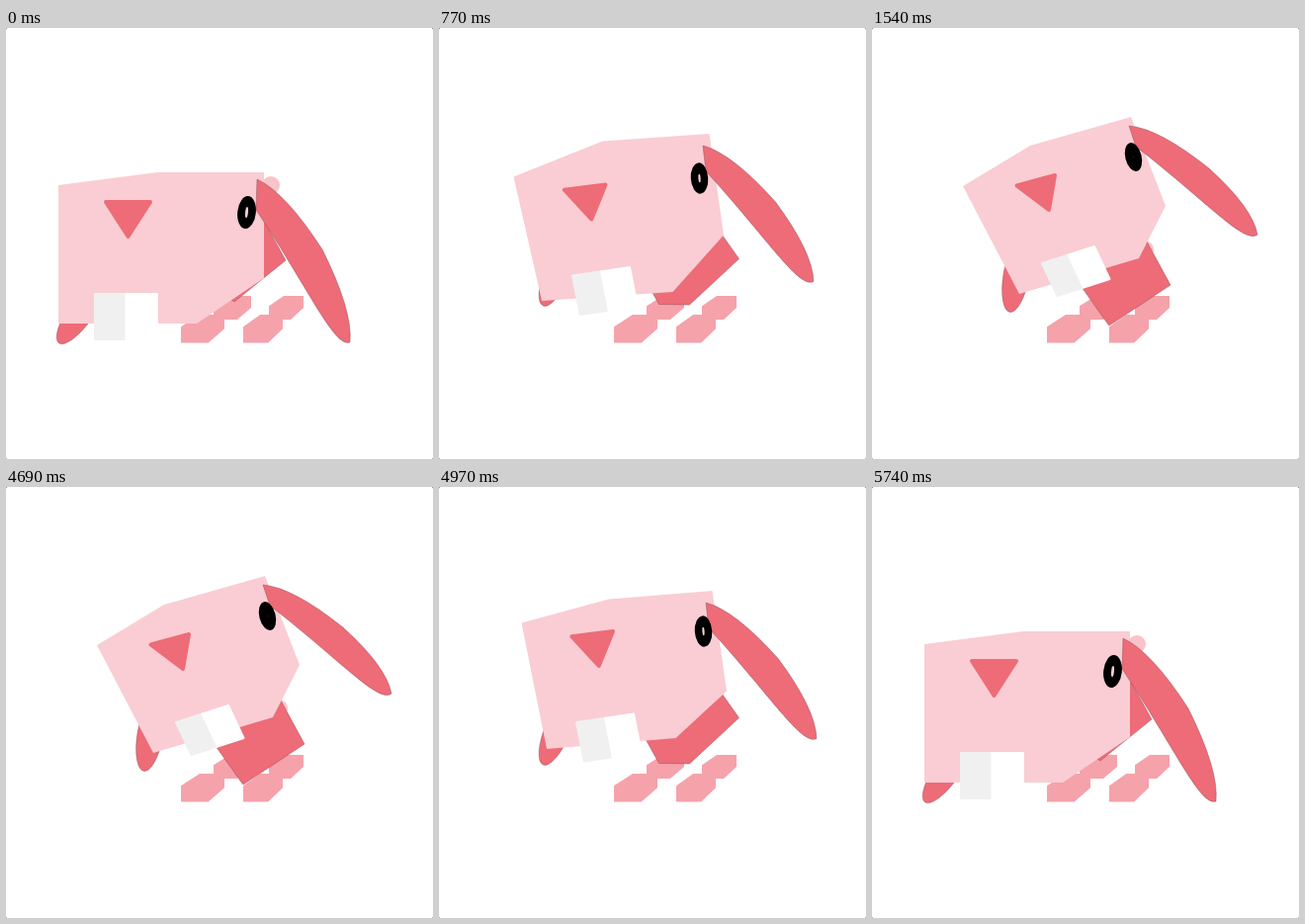
Recreate the animation shown at these times as an HTML page with a canvas. Size 432 px wide and 436 px high, loop 5810 ms.

```html
<!DOCTYPE html>
<html lang="en">
<head>
<meta charset="utf-8">
<title>Pink creature</title>
<style>
html, body { margin: 0; height: 100%; overflow: hidden; background: #444; }
canvas { display: block; background: #fff; border-radius: 1.5px; }
</style>
</head>
<body>
<canvas id="stage" width="432" height="436"></canvas>
<script>
const ctx = document.getElementById('stage').getContext('2d');
const LOOP = 5810, STEP = 70, MOVE = 460, RISE = 540, FALL = 4740;
const RED = '#ed6c78', PINK = '#f9cdd3', FOOT = '#f5a2ab', EDGE = 'rgba(125,65,75,.4)';

// Key points as x, y pairs: lowered, raised, then the sideways arc
// while rising and while falling (one pair can serve all points)
const head = [
  [53,159, 153,146, 261,146, 261,253, 193,299, 53,299],
  [92,160, 160,119, 262,90, 297,180, 270,233, 149,269],
  [3,-9, 9,-18, 12,-11, 9,-7, 5,1, 3,-8],
  [11,-22, 15,-19, 15,-13, 12,-10, 8,-12, 8,-19]];
const body = [
  [262,197, 283,235, 231,277, 228,275, 205,240],
  [277,214, 302,260, 240,301, 239,300, 207,255],
  [10,-6, 11,-14, 18,-9, -11,-8, 1,4]];
// Root, bend, tip, heel
const ear = [[254,153, 320,224, 348,318, 253,184], [260,99, 341,142, 390,209, 267,120], [10,-7], [13,-9]];
const nose = [[101,176, 146,176, 123.5,211], [146.5,159.5, 185,149, 179,184], [3,-4], [10.5,-16.5]];
// Three corners of the strip that holds both teeth
const teeth = [[90,269, 153,269, 90,315], [172,238, 225,221, 187.5,271], [4,-3], [8,-15.5]];
const eye = [[243.5,186.5], [264.5,130.5], [9.5,-6.5], [13.5,-12.5]];
const farEar = [[76.5,286], [146,250], [9,-23]];
const tail = [[268,159], [276,224], [0,0]];

const smooth = t => {
  t = Math.min(1, Math.max(0, t));
  return t * t * (3 - 2 * t);
};

function polygon(c) {
  ctx.beginPath();
  for (let i = 0; i < c.length; i += 2) ctx.lineTo(c[i], c[i + 1]);
  ctx.closePath();
}

function paint(color, edge, width = 1) {
  ctx.fillStyle = color;
  ctx.fill();
  if (!edge) return;
  ctx.strokeStyle = edge;
  ctx.lineWidth = width;
  ctx.stroke();
}

function ellipse([x, y], rx, ry, tilt, color, edge) {
  ctx.beginPath();
  ctx.ellipse(x, y, rx, ry, tilt * Math.PI / 180, 0, 2 * Math.PI);
  paint(color, edge);
}

function toe(x, y, w, h) {
  const shape = [0, .43, .43, 0, 1, 0, 1, .5, .63, 1, 0, 1];
  polygon(shape.map((v, i) => i % 2 ? y + v * h : x + v * w));
  paint(FOOT);
}

function drawEar([rx, ry, bx, by, tx, ty, hx, hy]) {
  // Point at share u of the way, pushed outward by d
  const beside = (x, y, x2, y2, u, d) => {
    const dx = x2 - x, dy = y2 - y, len = Math.hypot(dx, dy);
    return [x + u * dx + d * dy / len, y + u * dy - d * dx / len];
  };
  ctx.beginPath();
  ctx.moveTo(rx, ry);
  ctx.quadraticCurveTo(...beside(rx, ry, bx, by, .3, 12), bx, by);
  ctx.quadraticCurveTo(...beside(bx, by, tx, ty, .7, 12), tx, ty);
  ctx.bezierCurveTo(...beside(tx, ty, hx, hy, .03, 16), ...beside(tx, ty, hx, hy, .4, 3), hx, hy);
  ctx.closePath();
  paint(RED, EDGE);
}

function drawTeeth([x, y, x2, y2, x3, y3]) {
  const wx = (x2 - x) / 2, wy = (y2 - y) / 2, dx = x3 - x, dy = y3 - y;
  ['#f0f0f0', '#fff'].forEach((color, i) => {
    const ax = x + i * wx, ay = y + i * wy;
    polygon([ax, ay, ax + wx, ay + wy, ax + wx + dx, ay + wy + dy, ax + dx, ay + dy]);
    paint(color, color, 2);
  });
}

function draw(t) {
  const falling = t > LOOP / 2;
  const p = falling ? 1 - smooth((t - FALL) / MOVE) : smooth((t - RISE) / MOVE);
  const pose = ([low, high, up, down = up]) => {
    const arc = falling ? down : up;
    return low.map((v, i) => v + (high[i] - v) * p + arc[i % arc.length] * 4 * p * (1 - p));
  };

  ctx.clearRect(0, 0, 432, 436);
  ctx.lineJoin = 'round';
  ellipse(pose(tail), 9, 9, 0, '#f9c3c9');
  toe(210, 271, 38, 24);
  toe(177, 290, 44, 28.5);
  toe(266, 271, 35, 24);
  toe(240, 290, 40, 28.5);
  ellipse(pose(farEar), 40 - 2 * p, 13, 125 - 25 * p, RED, EDGE);
  polygon(pose(body));
  paint(RED, EDGE);
  polygon(pose(head));
  paint(PINK);
  drawTeeth(pose(teeth));
  polygon(pose(nose));
  paint(RED, RED, 4);
  drawEar(pose(ear));

  const center = pose(eye), tilt = 6 - 20 * p, slit = 5.5 - 5 * p * p;
  ellipse(center, 9.3 - 1.1 * p, 16.5 - 1.7 * p, tilt, '#000');
  ellipse(center, slit * .26, slit, tilt, PINK);
}

const start = performance.now();
function tick() {
  const t = (performance.now() - start) % LOOP;
  draw(t - t % STEP);
  requestAnimationFrame(tick);
}
tick();
</script>
</body>
</html>
```
